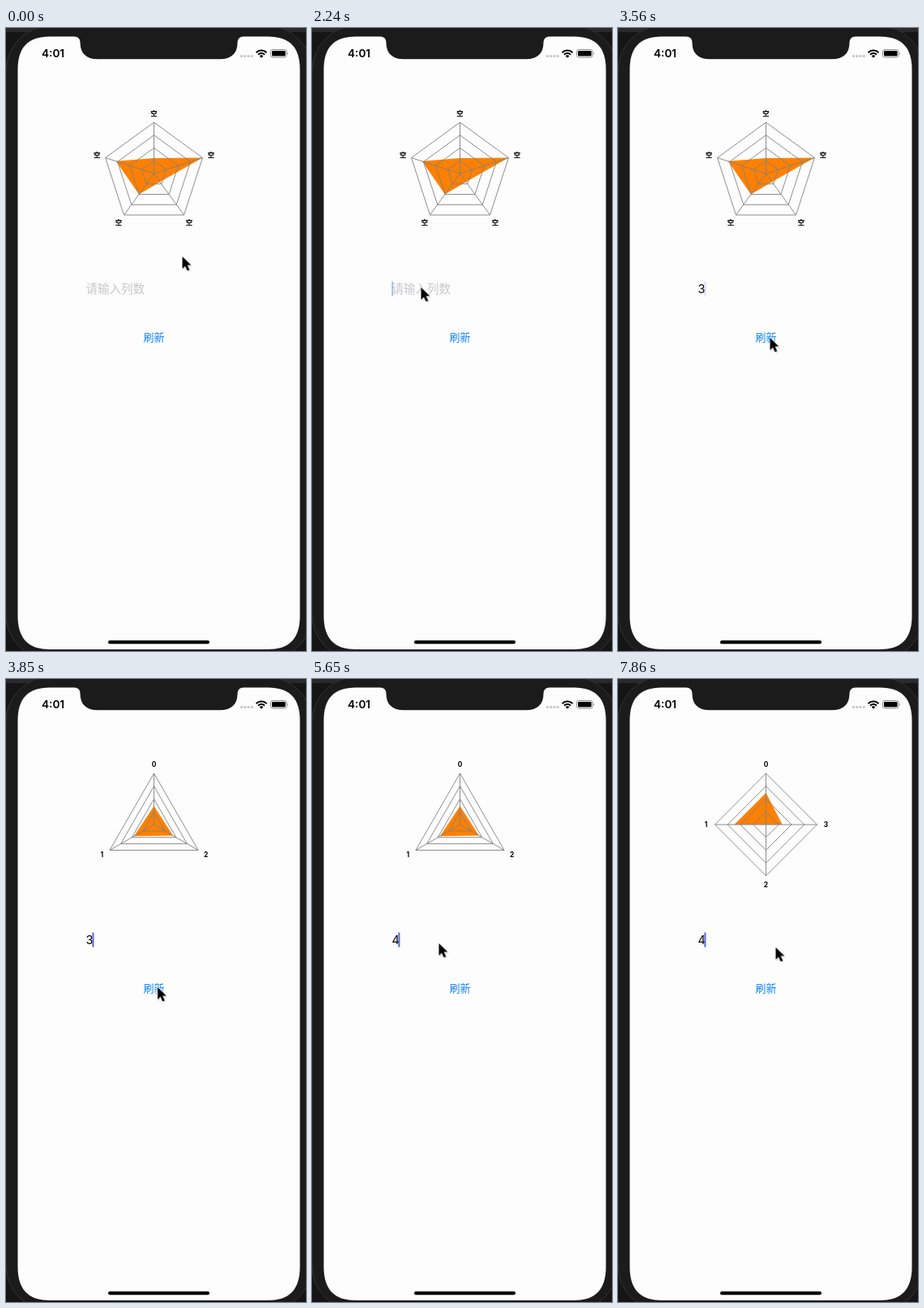
An HTML page for the animation above (8 s loop, 370 px wide and 766 px high).

```html
<!DOCTYPE html>
<html lang="zh">
<head>
<meta charset="utf-8">
<title>Radar chart</title>
<style>
html, body { margin: 0; width: 100%; height: 100%; overflow: hidden; background: #1b1b1b; }
svg { display: block; width: 370px; height: 766px; }
text { font-family: Inter, "Noto Sans CJK SC", "Noto Sans CJK", sans-serif; }
.label { font-size: 8.4px; font-weight: 700; text-anchor: middle; }
.grid { fill: none; stroke: #808080; stroke-width: .9; }
.area { fill: #ff8000; }
.field { font-size: 14.5px; }
#hint { fill: #c7c7cc; }
#button { font-size: 13px; fill: #1183ff; }

#five, #three, #four, #hint, #typed3, #typed4, #button, #caret, #cursor {
  animation: 8s step-end infinite;
}
#five { animation-name: five; }
#three { animation-name: three; }
#four { animation-name: four; }
#hint { animation-name: hint; }
#typed3 { animation-name: typed3; }
#typed4 { animation-name: typed4; }
#button { animation-name: press; }
#caret { animation-name: blink, caretMove; }
#cursor { animation-name: point; }

@keyframes five { 0% { opacity: 1 } 46.375%, 100% { opacity: 0 } }
@keyframes three { 0% { opacity: 0 } 46.375% { opacity: 1 } 89%, 100% { opacity: 0 } }
@keyframes four { 0% { opacity: 0 } 89%, 100% { opacity: 1 } }

@keyframes hint {
  0% { opacity: 1 } 35.375% { opacity: 0 }
  65% { opacity: 1 } 70.625%, 100% { opacity: 0 }
}
@keyframes typed3 { 0% { opacity: 0 } 35.375% { opacity: 1 } 65%, 100% { opacity: 0 } }
@keyframes typed4 { 0% { opacity: 0 } 70.625%, 100% { opacity: 1 } }

@keyframes press {
  0% { opacity: 1 } 46.375% { opacity: .45 } 48.125% { opacity: 1 }
  87.25% { opacity: .2 } 89% { opacity: .6 } 90.875%, 100% { opacity: 1 }
}
@keyframes blink {
  0% { opacity: 0 } 20.5% { opacity: 1 } 28% { opacity: .45 } 29.75% { opacity: 0 }
  33.5% { opacity: 1 } 44.5% { opacity: .2 } 46.375% { opacity: 0 }
  48.125% { opacity: 1 } 55.625% { opacity: .4 } 57.5% { opacity: 0 }
  61.25% { opacity: .6 } 63.125% { opacity: 1 }
  78% { opacity: .4 } 79.875% { opacity: 0 } 83.5% { opacity: 1 }
  90.875% { opacity: .4 } 92.75% { opacity: 0 } 96.375%, 100% { opacity: 1 }
}
@keyframes caretMove {
  0% { transform: none } 35.375% { transform: translateX(8.2px) }
  65% { transform: none } 70.625%, 100% { transform: translateX(8.2px) }
}
@keyframes point {
  0% { transform: translate(217.5px, 281px) }
  1.875% { transform: translate(214px, 285px) }
  3.75% { transform: translate(192px, 304px) }
  5.625% { transform: translate(163px, 323px) }
  7.5% { transform: translate(146px, 330px) }
  9.375% { transform: translate(138px, 325px) }
  11.25% { transform: translate(135px, 321px) }
  13.125% { transform: translate(134.5px, 319px) }
  37.125% { transform: translate(139px, 326px) }
  39% { transform: translate(162px, 352px) }
  40.875% { transform: translate(181px, 374px) }
  42.75% { transform: translate(187.5px, 381px) }
  48.125% { transform: translate(187px, 379px) }
  50% { transform: translate(180px, 364px) }
  51.875% { transform: translate(168px, 344px) }
  53.75% { transform: translate(160px, 330px) }
  55.625% { transform: translate(156.5px, 325px) }
  78% { transform: translate(205px, 392px) }
  79.875% { transform: translate(292.5px, 515px) }
  81.625% { transform: translate(268px, 480px) }
  83.5% { transform: translate(205px, 400px) }
  85.375% { transform: translate(186.5px, 379px) }
  92.75% { transform: translate(187px, 375px) }
  94.5% { transform: translate(191px, 353px) }
  96.375% { transform: translate(194px, 335px) }
  98.25%, 100% { transform: translate(194.5px, 330px) }
}
</style>
</head>
<body>
<svg viewBox="0 0 370 766">
  <rect width="370" height="766" fill="#151515"/>
  <rect width="370" height="5" fill="#2a2a2b"/>
  <rect x="0" y="-3" width="377" height="780" rx="56" fill="#1b1b1b" stroke="#343434"/>
  <path fill="#fdfdfd" d="M54 10.5H323C350 10.5 362.5 24 362.5 51V723C362.5 750 350 764 323 764H54C27 764 14.5 750 14.5 723V51C14.5 24 27 10.5 54 10.5Z"/>
  <path fill="#1b1b1b" d="M84 10Q91.5 11 91.5 18C91.5 31 99 38.3 113 38.3H264C278 38.3 285.5 31 285.5 18Q285.5 11 293 10Z"/>

  <text x="44" y="36" font-size="13.6" font-weight="600">4:01</text>
  <g fill="#c4c4c4">
    <circle cx="290.5" cy="34.5" r="1.6"/><circle cx="294.8" cy="34.5" r="1.6"/>
    <circle cx="299" cy="34.5" r="1.6"/><circle cx="303.3" cy="34.5" r="1.6"/>
  </g>
  <g fill="none" stroke="#000" stroke-width="2">
    <path d="M308.6 30.2A9 9 0 0 1 321.4 30.2M311 32.7A5.6 5.6 0 0 1 319 32.7"/>
    <path d="M315 36.8L312.7 34.4A3.3 3.3 0 0 1 317.3 34.4Z" fill="#000" stroke="none"/>
  </g>
  <rect x="326.5" y="26.5" width="19.6" height="9.6" rx="2.6" fill="none" stroke="#8c8c8c"/>
  <rect x="328" y="28" width="16.6" height="6.6" rx="1.3"/>
  <path d="M347.2 29.6Q349 31.3 347.2 33Z" fill="#8c8c8c"/>

  <g id="five"></g>
  <g id="three"></g>
  <g id="four"></g>

  <text id="hint" class="field" x="98.5" y="326">请输入列数</text>
  <text id="typed3" class="field" x="98.5" y="326">3</text>
  <text id="typed4" class="field" x="98.5" y="326">4</text>
  <rect id="caret" x="98.3" y="311.5" width="1.9" height="18.3" rx=".9" fill="#4a5fdc"/>
  <text id="button" x="169.5" y="385.4">刷新</text>
  <rect x="126" y="753" width="125" height="4.3" rx="2.15"/>

  <g id="cursor">
    <path d="M1 2V17L4.6 13.6L7.2 19L10 17.8L7.6 12.4H12Z" fill="#000" opacity=".16"/>
    <path d="M0 0V15L3.5 11.7L6.1 17.5L8.8 16.3L6.2 10.6H10.8Z" stroke="#fff" stroke-width="1.4" paint-order="stroke" stroke-linejoin="round"/>
  </g>
</svg>
<script>
const CX = 182.5, CY = 179, R = 63, LABEL_R = 74, RINGS = 4;

// Axes run counterclockwise from the top.
function spot(i, n, r) {
  const a = 2 * Math.PI * i / n;
  return [CX - r * Math.sin(a), CY - r * Math.cos(a)];
}

function radar(id, values, name) {
  const n = values.length;
  const shape = radius => values.map((v, i) => spot(i, n, radius(v)).join()).join(" ");
  let out = `<polygon class="area" points="${shape(v => v * R)}"/>`;
  for (let k = 1; k <= RINGS; k++) {
    out += `<polygon class="grid" points="${shape(() => R * k / RINGS)}"/>`;
  }
  values.forEach((v, i) => {
    const [lx, ly] = spot(i, n, LABEL_R);
    out += `<path class="grid" d="M${CX} ${CY}L${spot(i, n, R)}"/>` +
      `<text class="label" x="${lx}" y="${ly + 3.1}">${name(i)}</text>`;
  });
  document.getElementById(id).innerHTML = out;
}

radar("five", [.3, .78, .5, .2, 1], () => "空");
radar("three", [.36, .45, .43], i => i);
radar("four", [.62, .62, 0, .32], i => i);
</script>
</body>
</html>
```
